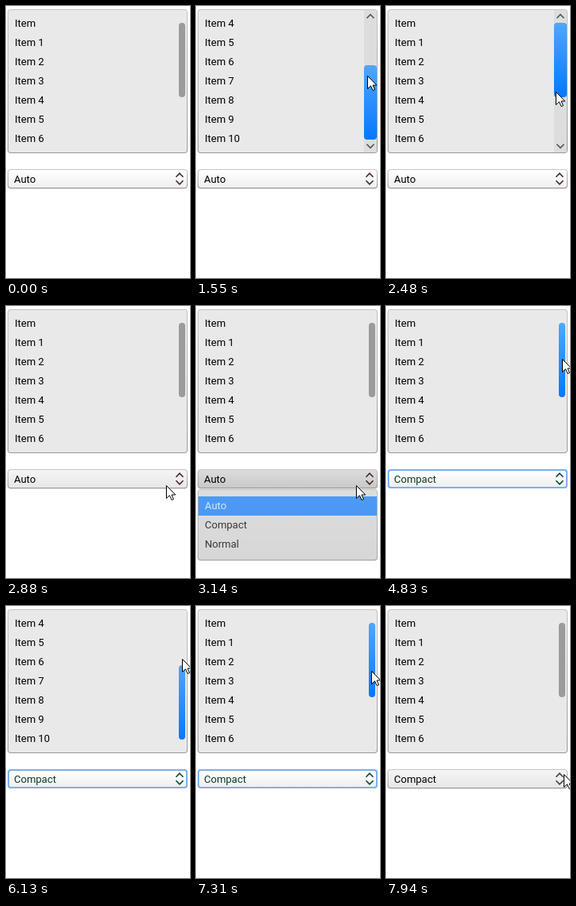
Recreate the animation shown at these times as an HTML page with a canvas. Size 230 by 340 pixels, loop 8 s.

```html
<!DOCTYPE html>
<html lang="en">
<head>
<meta charset="utf-8">
<title>Scroll bar modes</title>
<style>
  html, body { margin: 0; width: 100%; height: 100%; overflow: hidden; background: #fff; }
  canvas { display: block; }
</style>
</head>
<body>
<canvas id="stage" width="230" height="340"></canvas>
<script>
const ctx = document.getElementById('stage').getContext('2d');
const LOOP = 8000;
const BLUE = ['#4fa6ff', '#0578ff'];

// Pointer moves: start, end, number of steps, target x, y
const moves = [
  [860, 1120, 5, 216, 86],
  [1480, 1480, 1, 214, 87],
  [2480, 2880, 7, 200, 224],
  [3320, 3580, 5, 192, 269],
  [3950, 3950, 1, 240, 62],
  [4390, 4390, 1, 227, 62],
  [4440, 4440, 1, 231, 62],
  [4640, 4830, 4, 220, 66],
  [7310, 7310, 1, 219, 81],
  [7360, 7500, 3, 219, 92],
  [7820, 7940, 3, 222, 210]
];

// Wheel notches: time, list offset
const notches = [
  [1480, 72], [1550, 96], [1870, 24], [1920, 0],
  [5820, 72], [6130, 96], [6630, 24], [6860, 0]
];

function pointerAt(t) {
  let x = 231, y = 75;
  for (const [a, b, n, tx, ty] of moves) {
    if (t < a) break;
    const k = b > a ? Math.min(n, Math.floor((t - a) / (b - a) * (n - 1) + 1e-6) + 1) / n : 1;
    x += (tx - x) * k;
    y += (ty - y) * k;
  }
  return { x: Math.round(x), y: Math.round(y) };
}

function scrollAt(t) {
  let pos = 0;
  for (const [at, to] of notches) if (t >= at) pos = to;
  return pos;
}

const inside = (p, x, y, w, h) => p.x >= x && p.x < x + w && p.y >= y && p.y < y + h;
const ramp = (t, a, b) => Math.max(0, Math.min(1, (t - a) / (b - a)));

function shade(y, h, [from, to]) {
  const g = ctx.createLinearGradient(0, y, 0, y + h);
  g.addColorStop(0, from);
  g.addColorStop(1, to);
  return g;
}

function box(x, y, w, h, r, fill) {
  ctx.beginPath();
  ctx.roundRect(x, y, w, h, r);
  ctx.fillStyle = fill;
  ctx.fill();
}

function panel(x, y, w, h, fill, edge) {
  box(x, y, w, h, 4, shade(y, h, edge));
  box(x + 1, y + 1, w - 2, h - 2, 3, fill);
}

function text(s, x, y, color = '#000') {
  ctx.font = '13px Roboto, sans-serif';
  ctx.fillStyle = color;
  ctx.fillText(s, x, y);
}

function chevron(x, y, dir, color) {
  ctx.beginPath();
  ctx.moveTo(x - 4.5, y + 2.3 * dir);
  ctx.lineTo(x, y - 2.3 * dir);
  ctx.lineTo(x + 4.5, y + 2.3 * dir);
  ctx.strokeStyle = color;
  ctx.lineWidth = 1.6;
  ctx.stroke();
}

function drawList(p, scroll, compact) {
  panel(2, 4, 225, 180, '#e9e9e9', ['#c4c4c4', '#999']);
  ctx.save();
  ctx.beginPath();
  ctx.roundRect(3, 5, 223, 178, 3);
  ctx.clip();
  for (let i = 0; i < 7; i++) {
    const n = i + scroll / 24;
    text(n ? 'Item ' + n : 'Item', 11, 26 + 24 * i);
  }
  const hot = inside(p, 210, 5, 17, 179);
  const wide = hot && !compact;
  const y = 21 + Math.round(scroll / 96 * 53);
  if (wide) {
    ctx.fillStyle = '#dcdedd';
    ctx.fillRect(210, 5, 16, 178);
    chevron(218, 13, 1, '#4d555a');
    chevron(218, 175, -1, '#4d555a');
  }
  const fill = hot ? shade(y, 93, BLUE) : '#9b9b9b';
  if (wide) box(210, y, 16, 93, 4, fill);
  else box(216, y, 8, 93, 4, fill);
  ctx.restore();
}

function drawCombo(t, p, compact) {
  const hover = inside(p, 2, 204, 225, 24);
  const down = t >= 3000 && t < 4000;
  const focus = compact && !hover && !down;
  const face = down ? ['#dcdcdc', '#c9c9c9'] : hover ? ['#f5f5f5', '#e7e7e7'] : ['#ffffff', '#efefef'];
  if (focus) {
    box(2, 204, 225, 24, 4, '#7ab0f2');
    box(4, 206, 221, 20, 2.5, shade(206, 20, face));
  } else {
    box(2, 205, 225, 24, 4, 'rgba(0,0,0,.1)');
    panel(2, 204, 225, 24, shade(205, 22, face), ['#c8c8c8', '#979797']);
  }
  const ink = focus ? '#0b3a24' : '#000';
  const arrow = focus ? '#0b4a2c' : compact ? '#40403c' : '#4a2925';
  text(compact ? 'Compact' : 'Auto', 10, 221, ink);
  chevron(217, 211.5, 1, arrow);
  chevron(217, 220.5, -1, arrow);
}

function drawPopup(t, p) {
  const alpha = ramp(t, 3000, 3190) * (1 - ramp(t, 3830, 4080));
  if (!alpha) return;
  ctx.save();
  ctx.globalAlpha = alpha;
  box(2, 230, 225, 89, 4, 'rgba(0,0,0,.12)');
  panel(2, 229, 225, 89, '#e9e9e9', ['#b0b0b0', '#8e8e8e']);
  const current = p.y >= 262 || t >= 3890 ? 1 : 0;
  ctx.fillStyle = '#1a83fc';
  ctx.fillRect(3, 238 + 24 * current, 223, 24);
  ['Auto', 'Compact', 'Normal'].forEach((s, i) =>
    text(s, 11, 254 + 24 * i, i === current ? '#fff' : '#000'));
  ctx.restore();
}

function drawPointer({ x, y }) {
  const shape = [[0, 0], [0, 16], [4, 12.3], [6.6, 18], [9, 17], [6.5, 11.5], [11.3, 11.5]];
  ctx.beginPath();
  for (const [dx, dy] of shape) ctx.lineTo(x + dx + 0.5, y + dy + 0.5);
  ctx.closePath();
  ctx.fillStyle = '#fff';
  ctx.fill();
  ctx.strokeStyle = '#000';
  ctx.lineWidth = 1;
  ctx.stroke();
}

function draw(t) {
  const p = pointerAt(t);
  const compact = t >= 3950;
  ctx.fillStyle = '#fff';
  ctx.fillRect(0, 0, 230, 340);
  drawList(p, scrollAt(t), compact);
  drawCombo(t, p, compact);
  drawPopup(t, p);
  drawPointer(p);
}

const start = performance.now();
function tick() {
  draw((performance.now() - start) % LOOP);
  requestAnimationFrame(tick);
}
tick();
</script>
</body>
</html>
```
